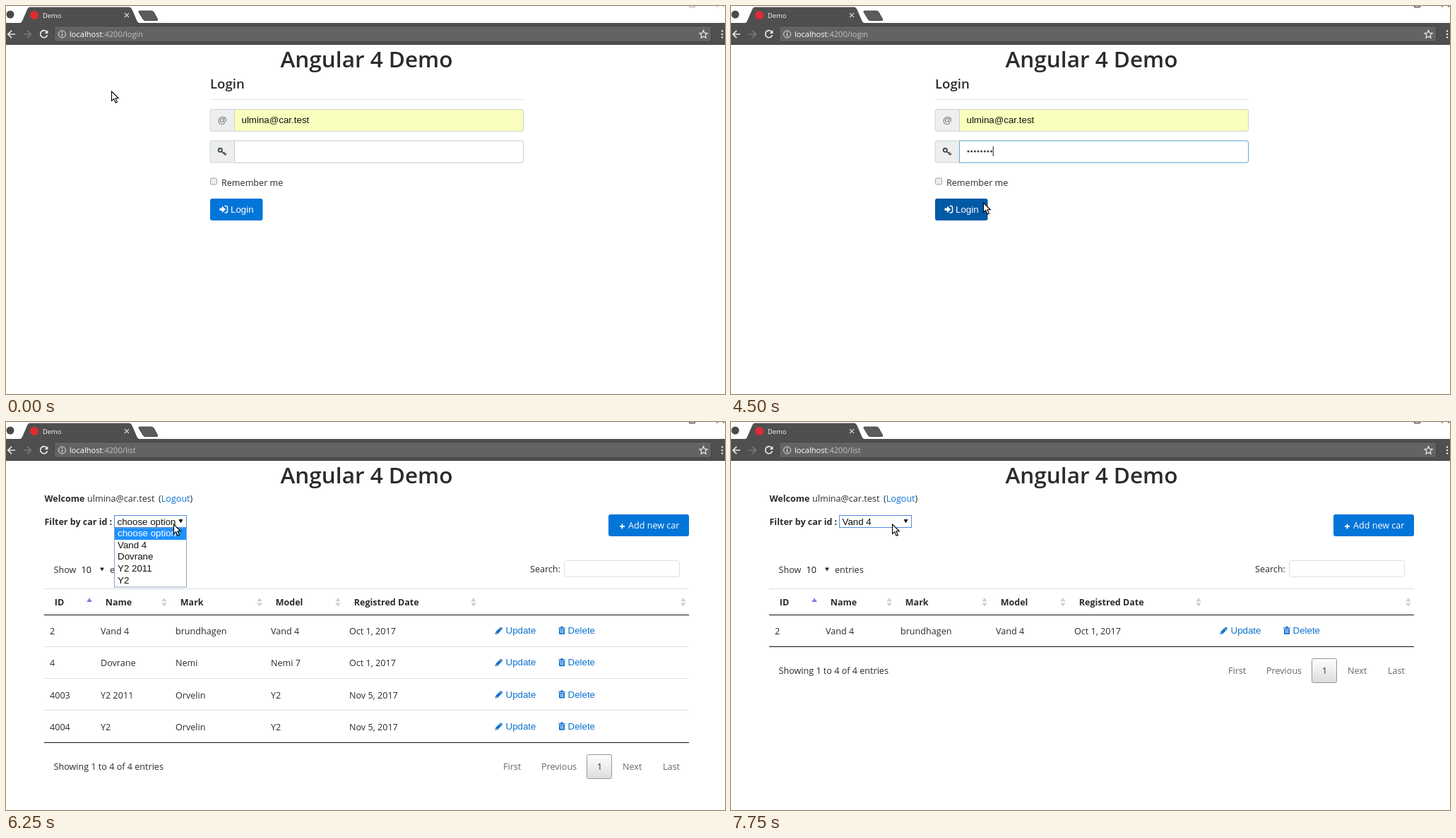
An HTML page that plays this animation: 1018x550 px, repeating every 8 s.

```html
<!DOCTYPE html>
<html lang="en">
<head>
<meta charset="utf-8">
<title>Demo</title>
<style>
  html, body { margin: 0; width: 100%; height: 100%; overflow: hidden; background: #fff; }
  svg { display: block; width: 100%; height: 100%; }
  text { font: 12.6px "Open Sans", "Noto Sans", sans-serif; fill: #292b2c; white-space: pre; }
  .bold { font-size: 12.5px; font-weight: 700; }
  .arial { font: 13.33px "Liberation Sans", sans-serif; }
  .black { fill: #111; }
  .white { fill: #fff; }
  .link { fill: #0c72cf; }
  .grey { fill: #666; }
  .title { font-size: 31.5px; font-weight: 600; text-anchor: middle; }
  .subtitle { font-size: 18.6px; font-weight: 600; }
  .tab { font-size: 9.3px; fill: #fff; }
  .url { font-size: 11.1px; fill: #c2c2c2; }
</style>
</head>
<body>
<svg id="stage" viewBox="0 0 1018 550" xmlns="http://www.w3.org/2000/svg">
  <defs>
    <linearGradient id="pageFill" x2="0" y2="1">
      <stop stop-color="#fff"/><stop offset="1" stop-color="#dcdcdc"/>
    </linearGradient>
    <g id="pencil">
      <path d="M0 11l.8-3.6L7 1.2q1-1 2 0l.9.9q.9 1 0 1.9L3.700 10.300z"/>
      <path d="M6 2.300l2.800 2.800M1.300 8.300l1.500 1.500" stroke="#fff" stroke-width=".8"/>
    </g>
    <g id="trash">
      <path d="M0 2h3l.7-1.700h2.600L7 2h3v1.200H0zM1 4h8v6.500q0 1-1 1H2q-1 0-1-1z"/>
      <path d="M3.300 5v5M5 5v5M6.700 5v5" stroke="#fff" stroke-width=".8"/>
    </g>
  </defs>
  <g id="chrome"></g>
  <g id="login"></g>
  <g id="list"></g>
  <path id="pointer" d="M0 0v13.500l3.200-2.900 2.400 5.600 2.300-1-2.400-5.400h4.300z" fill="#fff" stroke="#000" stroke-width="1.100"/>
  <path id="beam" d="M-3-8h2.200l.8.800.8-.8H3M0-7v14M-3 8h2.200l.8-.8.8.800H3" fill="none" stroke="#222"/>
</svg>
<script>
const LOOP = 8000;
const EMAIL = 'ulmina@car.test';
const CARS = [
  ['2', 'Vand 4', 'brundhagen', 'Vand 4', 'Oct 1, 2017'],
  ['4', 'Dovrane', 'Nemi', 'Nemi 7', 'Oct 1, 2017'],
  ['4003', 'Y2 2011', 'Orvelin', 'Y2', 'Nov 5, 2017'],
  ['4004', 'Y2', 'Orvelin', 'Y2', 'Nov 5, 2017']
];
const COLUMNS = [62, 134, 240, 375, 486];
const OPTIONS = ['choose option', ...CARS.map(car => car[1])];

// Each step adds to the state left by the one before it.
const STEPS = [
  { at: 0, page: 'login', cursor: 'pointer', x: 149, y: 121, active: false, focus: false,
    caret: false, dots: 0, hover: false, selectFocus: false, open: false, marked: 0, chosen: 0 },
  { at: 250, x: 214, y: 146 },
  { at: 500, x: 318, y: 184 },
  { at: 750, cursor: 'beam', x: 398, y: 209, active: true, focus: true, caret: true },
  { at: 1000, cursor: '' },
  { at: 1250, caret: false },
  { at: 1750, caret: true, dots: 1 },
  { at: 2000, dots: 2 },
  { at: 2250, dots: 4 },
  { at: 2500, dots: 5 },
  { at: 3250, dots: 8 },
  { at: 3750, cursor: 'pointer', x: 395, y: 232 },
  { at: 4000, x: 380, y: 258 },
  { at: 4250, x: 360, y: 279, hover: true },
  { at: 4500, x: 357, y: 279 },
  { at: 4750, page: 'list' },
  { at: 5000, x: 366, y: 190 },
  { at: 5250, x: 312, y: 62 },
  { at: 5500, x: 262, y: 104 },
  { at: 5750, x: 237, y: 145 },
  { at: 6000, selectFocus: true },
  { at: 6250, open: true },
  { at: 6500, x: 228, y: 158 },
  { at: 6750, x: 213, y: 178, marked: 1 },
  { at: 7250, open: false, chosen: 1 },
  { at: 7500, x: 221, y: 160 },
  { at: 7750, x: 228, y: 145 }
];
for (let i = 1; i < STEPS.length; i++) STEPS[i] = { ...STEPS[i - 1], ...STEPS[i] };

const $ = id => document.getElementById(id);
const text = (x, y, str, cls = '') => `<text x="${x}" y="${y}" class="${cls}">${str}</text>`;
const rect = (x, y, w, h, fill, stroke = 'none', r = 0, id = '') =>
  `<rect x="${x}" y="${y}" width="${w}" height="${h}" fill="${fill}" stroke="${stroke}" rx="${r}" id="${id}"/>`;
const path = (d, fill, stroke = 'none', width = 1, extra = '') =>
  `<path d="${d}" fill="${fill}" stroke="${stroke}" stroke-width="${width}" ${extra}/>`;
const line = (y, x1, x2, colour) => path(`M${x1} ${y}H${x2}`, 'none', colour);
const circle = (x, y, r, fill, stroke = 'none', width = 1) =>
  `<circle cx="${x}" cy="${y}" r="${r}" fill="${fill}" stroke="${stroke}" stroke-width="${width}"/>`;
const icon = (name, x, y) => `<use href="#${name}" x="${x}" y="${y}" class="link"/>`;

function drawChrome() {
  return rect(0, 24, 1018, 31, '#4f4f4f') + line(54.5, 0, 1018, '#3c3c3c')
    + path('M19 24.500Q22 24 23.500 20L30 5Q31.500 1.500 34 1.500H174Q177 1.500 178.500 5L185 20Q187 24.500 190 24.500z', '#4f4f4f')
    + path('M188 8.500Q187.500 7 189 7H206Q208 7 209 8.500L214.500 18.500Q215.500 20.500 213.500 20.500H197Q195 20.500 194 18.500z', '#5c5c5c', '#444')
    + circle(6, 12, 5.5, '#4a4a4a')
    + circle(40, 13, 6, '#dd2c37')
    + text(52, 17, 'Demo', 'tab')
    + path('M168 10l6 6m0-6l-6 6', 'none', '#d0d0d0', 1.3)
    + path('M967.500 0V1.500H975.500V0M1006 1.500L1008 0M1017 1.500L1015 0', 'none', '#222', 1, 'id="windowButtons"')
    + path('M13 40H3m5-5.200L2.700 40 8 45.200', 'none', '#e8e8e8', 1.7)
    + path('M25 40H35m-5-5.200L35.300 40 30 45.200', 'none', '#7a7a7a', 1.7)
    + path('M57.500 36.500A5 5 0 1 0 58.500 41', 'none', '#e8e8e8', 1.7)
    + path('M59.500 34v5h-5z', '#e8e8e8')
    + rect(68.5, 28.5, 930, 22, '#636363', '#434343', 2)
    + circle(79.5, 40, 5, 'none', '#e8e8e8')
    + path('M79.500 39v4M79.500 36.700v1.300', 'none', '#e8e8e8', 1.3)
    + `<text x="90" y="44" class="url"><tspan fill="#fff">localhost</tspan>:4200/<tspan id="route"></tspan></text>`
    + path('M987.500 34.500l1.600 3.700 4 .4-3 2.700.9 4-3.500-2.100-3.500 2.100.9-4-3-2.700 4-.4z', 'none', '#e8e8e8', 1.2)
    + [35.5, 40, 44.5].map(y => circle(1014, y, 1.3, '#e8e8e8')).join('')
    + text(510.5, 87, 'Angular 4 Demo', 'title');
}

const inputGroup = (y, fill, id) =>
  rect(289, y, 443.5, 31, '#eceeef', '#cfd1d3', 3)
  + path(`M323.500 ${y}H729.500q3 0 3 3v25q0 3-3 3H323.500z`, fill, '#cfd1d3', 1, `id="${id}"`);

function drawLogin() {
  const dots = Array.from({ length: 8 }, (_, i) => circle(336 + 4.65 * i, 206, 1.55, '#444'));
  return text(289, 117, 'Login', 'subtitle')
    + line(132.5, 289, 733, '#e4e4e4')
    + inputGroup(146.5, '#faffbd', 'emailField')
    + text(299.5, 166, '@', 'arial grey')
    + text(333.5, 166, EMAIL, 'arial black')
    + inputGroup(191, '#fff', 'passwordField')
    + circle(303.3, 204.3, 2.6, 'none', '#464a4c', 1.9)
    + path('M305.300 206.200l5.700 5.300m-2.800-2.700l1.700-1.800m.3 3.800l1.700-1.800', 'none', '#464a4c', 1.7)
    + `<g id="dots">${dots.join('')}</g>`
    + rect(0, 199, 1, 14, '#222', 'none', 0, 'caret')
    + rect(289.5, 244, 9, 9, '#ededed', '#a2a2a2', 1.5)
    + text(305, 255, 'Remember me')
    + rect(289, 273, 74.5, 31, '#0275d8', 'none', 3, 'loginButton')
    + path('M302.500 286.500h3.500v-3l5 4.700-5 4.700v-3h-3.500z', '#fff')
    + path('M309.500 283.500h2q2 0 2 2v5.500q0 2-2 2h-2', 'none', '#fff', 1.4)
    + text(318, 293, 'Login', 'arial white');
}

const triangle = (x, y, w, h, fill) => path(`M${x - w} ${y}h${2 * w}l${-w} ${h}z`, fill);

function drawRow(car, i) {
  const y = 45.25 * i;
  return `<g class="row">`
    + car.map((cell, c) => text(COLUMNS[c], 301 + y, cell)).join('')
    + icon('pencil', 692.5, 290 + y) + text(707.5, 300 + y, 'Update', 'arial link')
    + icon('trash', 782, 289.5 + y) + text(795.5, 300 + y, 'Delete', 'arial link')
    + line(Math.floor(318.3 + y) + .5, 54, 967, i < 3 ? '#ddd' : '#111') + '</g>';
}

function drawList() {
  const heads = ['ID', 'Name', 'Mark', 'Model', 'Registred Date']
    .map((name, i) => text(COLUMNS[i] + 6.8, 260, name, 'bold')).join('');
  const sorters = [224, 359, 470, 662, 959]
    .map(x => triangle(x, 254.3, 3.7, -5, '#cfcfcf') + triangle(x, 256.5, 3.7, 5, '#cfcfcf')).join('');
  const pager = [[704, 'First'], [758, 'Previous'], [873, 'Next'], [930, 'Last']]
    .map(([x, name]) => text(x, 493, name, 'grey')).join('');
  const options = OPTIONS.map((name, i) =>
    text(158, 162 + 16.7 * i, name, 'arial black')).join('');
  return text(54.5, 112.5, 'Welcome', 'bold') + text(115, 112.5, EMAIL)
    + text(216, 112.5, '(<tspan class="link">Logout</tspan>)')
    + text(54.5, 145.5, 'Filter by car id :', 'bold')
    + rect(153.5, 132.5, 102, 17, '#fff', '#8a8a8a', 0, 'select')
    + '<text x="157.500" y="145.500" class="arial black" id="choice"></text>'
    + triangle(247.5, 138, 3, 5.5, '#111')
    + rect(853, 131, 114, 31, '#0275d8', 'none', 3)
    + path('M869 148h7M872.500 144.500v7', 'none', '#fff', 1.8)
    + text(881, 151, 'Add new car', 'white')
    + text(67.5, 214, 'Show') + text(106.5, 214, '10', 'black')
    + triangle(136, 206.5, 2.9, 5, '#222') + text(147, 214, 'entries')
    + text(742, 212.5, 'Search:')
    + rect(790.5, 196.5, 163, 23, '#fff', '#dedfe0', 3)
    + line(236.5, 54, 967, '#ddd') + heads
    + triangle(118, 255, 4, -5.5, '#7782e0') + sorters
    + line(273.5, 54, 967, '#111')
    + CARS.map(drawRow).join('')
    + path('M54 318.500H967', 'none', '#111', 1, 'id="tableEnd"')
    + '<g id="footer">' + text(67.5, 493, 'Showing 1 to 4 of 4 entries') + pager
    + rect(822.5, 471.5, 35, 34, 'url(#pageFill)', '#979797', 2) + text(837, 493, '1') + '</g>'
    + '<g id="menu">' + rect(153.5, 150.5, 102, 83.5, '#fff', '#8aa4c4')
    + rect(154, 0, 101, 16.5, '#1e90ff', 'none', 0, 'mark') + options + '</g>';
}

const show = (node, on) => node.setAttribute('visibility', on ? 'inherit' : 'hidden');
const set = (id, name, value) => $(id).setAttribute(name, value);

function render(s) {
  const filtered = s.chosen > 0;
  $('route').textContent = s.page;
  set('windowButtons', 'stroke', s.active ? '#222' : '#aaa');
  show($('login'), s.page === 'login');
  show($('list'), s.page === 'list');

  set('passwordField', 'stroke', s.focus ? '#66a9d3' : '#cfd1d3');
  [...$('dots').children].forEach((dot, i) => show(dot, i < s.dots));
  show($('caret'), s.caret);
  set('caret', 'x', 333.5 + 4.65 * s.dots);
  set('loginButton', 'fill', s.hover ? '#0259a5' : '#0275d8');

  set('select', 'stroke', s.selectFocus ? '#4f8be0' : '#8a8a8a');
  $('choice').textContent = OPTIONS[s.chosen];
  show($('menu'), s.open);
  set('mark', 'y', 150.5 + 16.5 * s.marked);
  $('menu').querySelectorAll('text').forEach((option, i) => {
    option.style.fill = i === s.marked ? '#fff' : '#111';
  });
  document.querySelectorAll('.row').forEach((row, i) => show(row, !filtered || i === s.chosen - 1));
  show($('tableEnd'), filtered);
  set('footer', 'transform', `translate(0 ${filtered ? -136 : 0})`);

  for (const id of ['pointer', 'beam']) {
    show($(id), s.cursor === id);
    set(id, 'transform', `translate(${s.x + .5} ${s.y})`);
  }
}

$('chrome').innerHTML = drawChrome();
$('login').innerHTML = drawLogin();
$('list').innerHTML = drawList();

const start = performance.now();
let current;
function tick() {
  const time = (performance.now() - start) % LOOP;
  const step = STEPS.findLast(s => s.at <= time);
  if (step !== current) render(current = step);
  requestAnimationFrame(tick);
}
tick();
</script>
</body>
</html>
```
